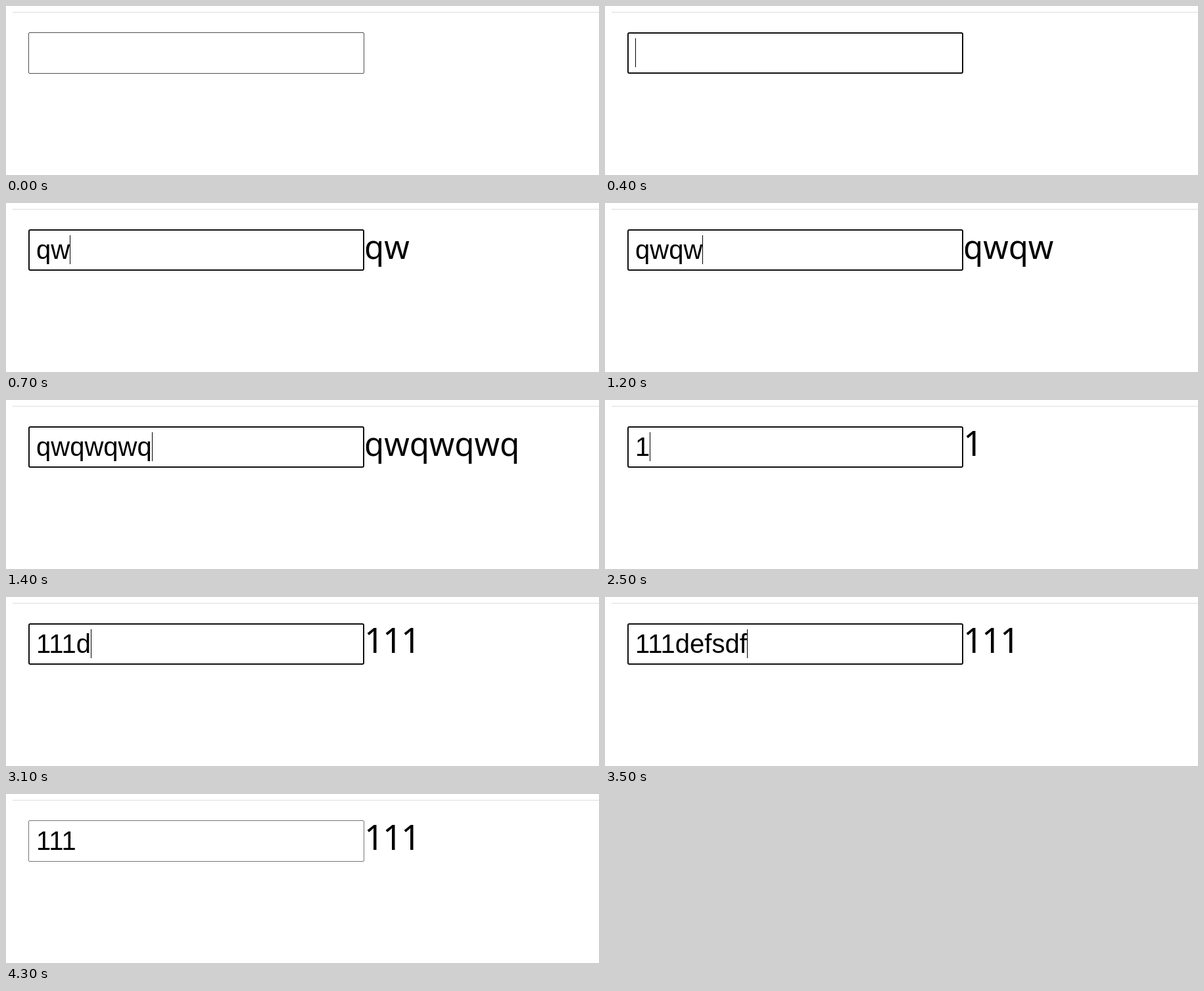
An HTML page that plays this animation: 902x257 px, repeating every 5.8 s.

```html
<!DOCTYPE html>
<html lang="en">
<head>
<meta charset="utf-8">
<title>Typing field</title>
<style>
  html, body { margin: 0; width: 100%; height: 100%; overflow: hidden; background: #fff; }
  svg { display: block; width: 902px; height: 257px; }
  #typed { font: 40px "Liberation Sans", Arial, sans-serif; font-kerning: normal; }
  #echo { font: 49px "Noto Sans", "Open Sans", sans-serif; }
  #echo.digits { font-size: 52px; letter-spacing: -1.7px; }
</style>
</head>
<body>
<svg viewBox="0 0 902 257">
  <rect width="902" height="257" fill="#fff"/>
  <rect x="10" y="9" width="892" height="1" fill="#ddd"/>
  <rect id="border" x="34.5" y="40.5" width="510" height="62" rx="1.5" fill="#fff"/>
  <rect id="ring" x="35" y="41" width="509" height="61" rx="2" fill="none" stroke="#101010" stroke-width="2"/>
  <text id="typed" x="46" y="85"></text>
  <rect id="caret" y="49" width="1" height="44" shape-rendering="crispEdges"/>
  <text id="echo" x="545" y="85"></text>
</svg>
<script>
const LOOP = 5800;
const TEXT_X = 46;
const [border, ring, typed, caret, echo] =
  ["border", "ring", "typed", "caret", "echo"].map(id => document.getElementById(id));

// [start ms, field text, caret visible]
const steps = [
  [0, "", false],
  [100, "", true],
  [500, "q", true],
  [700, "qw", true],
  [900, "qwq", true],
  [1200, "qwqw", true],
  [1300, "qwqwq", true],
  [1400, "qwqwqwq", true],
  [1600, "qwqwqw", true],
  [1900, "qwqwqw", false],
  [2100, "qw", false],
  [2200, "", false],
  [2400, "", true],
  [2500, "1", true],
  [2700, "11", true],
  [2800, "111", true],
  [3100, "111d", true],
  [3200, "111de", true],
  [3300, "111def", true],
  [3400, "111defsd", true],
  [3500, "111defsdf", true],
  [4000, "111defsdf", false],
  [4100, "111defsdfsd", true],
  [4300, "111", false]
];

let shown = null;

function draw(time) {
  const step = steps.findLast(s => s[0] <= time);
  if (step === shown) return;
  shown = step;
  const [start, text, caretOn] = step;
  const focused = start >= 100 && start < 4300;

  border.setAttribute("stroke", start === 0 ? "#4f4f4f" : "#767676");
  border.setAttribute("stroke-opacity", focused ? 0 : 1);
  ring.setAttribute("visibility", focused ? "visible" : "hidden");
  typed.textContent = text;

  // Once a number is entered, the echo keeps only the digits
  const digits = text.match(/^\d+/);
  echo.textContent = digits ? digits[0] : text;
  echo.setAttribute("class", digits ? "digits" : "");

  const width = text ? typed.getComputedTextLength() : 0;
  caret.setAttribute("x", Math.round(TEXT_X + width));
  caret.setAttribute("visibility", caretOn ? "visible" : "hidden");
}

const begin = performance.now();
function tick() {
  draw((performance.now() - begin) % LOOP);
  requestAnimationFrame(tick);
}
tick();
</script>
</body>
</html>
```
